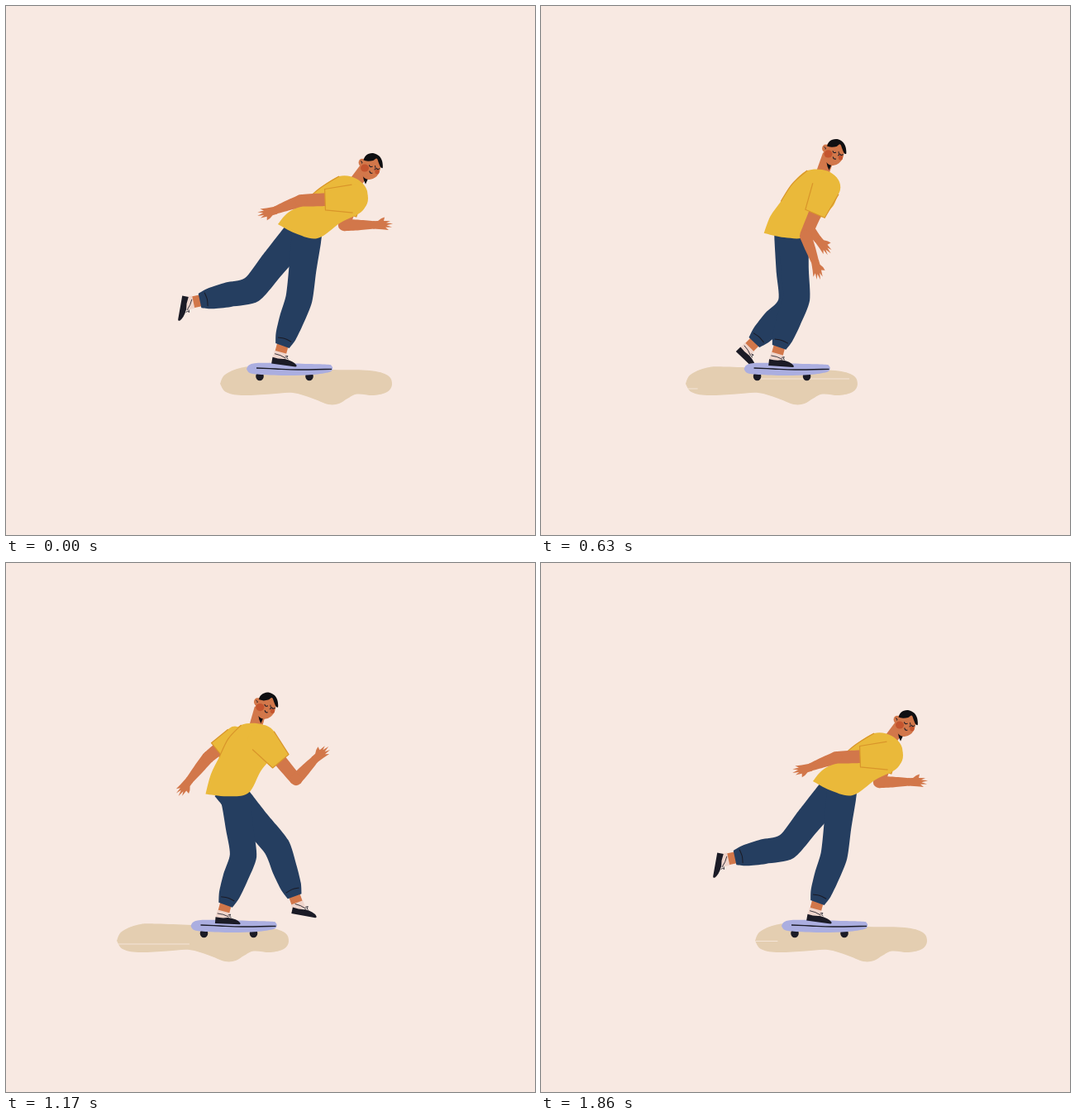
Write an HTML page with a canvas that moves like this. It is 640x640 px and loops after 1890 ms.

```html
<!DOCTYPE html>
<html lang="en">
<head>
<meta charset="utf-8">
<title>Skater</title>
<style>
html, body { margin: 0; width: 100%; height: 100%; overflow: hidden; background: #f8e9e2; }
canvas { display: block; width: 100%; height: 100%; }
</style>
</head>
<body>
<canvas id="stage" width="640" height="640"></canvas>
<script>
const ctx = document.getElementById('stage').getContext('2d');
const LOOP = 1890, STEP = 30, RAD = Math.PI / 180;
const C = {
  bg: '#f8e9e2', sand: '#e4ceb1', line: '#f5e5d8', board: '#abaee0', dark: '#1b1b26',
  skin: '#d2774a', blush: '#c4552f', shirt: '#eab93a', seam: '#d9952a',
  pants: '#253e60', sock: '#efd5cc', hair: '#0f0f12'
};

// ---- motion ----

// Monotone cubic through the keys, at rest at both ends.
function track(times, vals) {
  const n = times.length - 1;
  const rate = i => (vals[i + 1] - vals[i]) / (times[i + 1] - times[i]);
  const slope = vals.map((v, i) => {
    if (i === 0 || i === n) return 0;
    const a = rate(i - 1), b = rate(i);
    return a * b > 0 ? 2 * a * b / (a + b) : 0;
  });
  return t => {
    if (t >= times[n]) return vals[n];
    let i = 0;
    while (t >= times[i + 1]) i++;
    const h = times[i + 1] - times[i], u = (t - times[i]) / h, w = 1 - u;
    return vals[i] * (1 + 2 * u) * w * w + slope[i] * h * u * w * w
      + vals[i + 1] * u * u * (3 - 2 * u) - slope[i + 1] * h * u * u * w;
  };
}

// push, glide, step on, swing, step off, push, back to the start
const KEYS = [0, 480, 810, 1170, 1380, 1620, 1860];
const cycle = (...vals) => track(KEYS, [...vals, vals[0]]);

// Angles in degrees, clockwise from pointing right.
const pose = {
  ride: cycle(0, .472, .872, 1, .424, .072),
  lean: cycle(1, .72, 0, .09, .74, .97),
  nearUpper: cycle(178, 152, 65, 50, 127, 172),
  nearFore: cycle(159, 117, 5, -47, 58, 142),
  farUpper: cycle(108, 103, 108, 141, 125, 111),
  farFore: cycle(0, 18, 99, 129, 110, 11),
  thigh: track([0, 270, ...KEYS.slice(1)], [130, 135, 113, 64, 50, 94, 125, 130]),
  shin: cycle(168, 156, 100, 70, 126, 163),
  foot: cycle(100, 79, 5, 10, 67, 96)
};

// Shirt outline standing up and leaning, measured from the board's tail:
// hem corner, up the back to the neck, chest, belly, hem.
const UPRIGHT = [[16, 281], [22, 256], [31, 235], [41, 212], [56, 195], [82, 194],
  [96, 207], [91, 235], [81, 252], [68, 278], [43, 283]];
const LEANING = [[38, 264], [49, 251], [68, 239], [88, 221], [112, 206], [133, 209],
  [146, 224], [141, 247], [114, 262], [86, 281], [59, 275]];

// ---- drawing helpers ----

const mix = (a, b, u) => [a[0] + (b[0] - a[0]) * u, a[1] + (b[1] - a[1]) * u];
const add = (a, b) => [a[0] + b[0], a[1] + b[1]];
const angle = (a, b) => Math.atan2(b[1] - a[1], b[0] - a[0]);
const reach = (p, deg, d) => [p[0] + Math.cos(deg * RAD) * d, p[1] + Math.sin(deg * RAD) * d];

function spline(p, k = 6) {
  for (let i = 0; i < p.length - 1; i++) {
    const a = p[i - 1] || p[i], b = p[i], c = p[i + 1], d = p[i + 2] || c;
    ctx.bezierCurveTo(b[0] + (c[0] - a[0]) / k, b[1] + (c[1] - a[1]) / k,
      c[0] - (d[0] - b[0]) / k, c[1] - (d[1] - b[1]) / k, c[0], c[1]);
  }
}

function begin(p) { ctx.beginPath(); ctx.moveTo(...p[0]); }

function fill(color) { ctx.closePath(); ctx.fillStyle = color; ctx.fill(); }

function stroke(color, width) { ctx.strokeStyle = color; ctx.lineWidth = width; ctx.stroke(); }

function blob(p, color) { begin(p); spline(p); fill(color); }

function lines(p) { begin(p); p.slice(1).forEach(q => ctx.lineTo(...q)); }

function path(p, color, width) { lines(p); stroke(color, width); }

function curve(p, color, width) { begin(p); spline(p); stroke(color, width); }

function oval(x, y, rx, ry, color, turn = 0) {
  ctx.beginPath();
  ctx.ellipse(x, y, rx, ry, turn, 0, 7);
  fill(color);
}

function local([x, y], turn, draw) {
  ctx.save();
  ctx.translate(x, y);
  ctx.rotate(turn);
  draw();
  ctx.restore();
}

// Tapered tube around a centre line, half widths given per point.
function limb(p, half, color) {
  const left = [], right = [];
  p.forEach((q, i) => {
    const u = angle(p[i - 1] || q, i ? q : p[1]), v = i < p.length - 1 ? angle(q, p[i + 1]) : u;
    const dx = Math.cos(u) + Math.cos(v), dy = Math.sin(u) + Math.sin(v);
    const k = half[i] / (Math.hypot(dx, dy) || 1);
    left.push([q[0] + dy * k, q[1] - dx * k]);
    right.unshift([q[0] - dy * k, q[1] + dx * k]);
  });
  begin(left);
  spline(left, 8);
  ctx.lineTo(...right[0]);
  spline(right, 8);
  fill(color);
}

// ---- parts ----

// Streaks of wind across the sand: height, time, left end at that time, speed.
const STREAKS = [
  [463, 480, 177, .65], [451, 480, 362, .66], [461, 810, 312, .556],
  [461, 1380, 306, .64], [449.5, 1620, 203, .95], [457.5, 1620, 438, 1.09]
];

function puddle(x, t) {
  local([x, 0], 0, () => {
    blob([[0, 457], [6, 446], [26, 437.5], [50, 436.5], [136, 440], [181, 441], [203, 447],
      [208, 458], [202, 467], [186, 471], [166, 469.5], [154, 475], [144, 481], [131, 482],
      [111, 474.5], [88, 468], [61, 469.5], [26, 471], [7, 467], [0, 457]], C.sand);
    ctx.clip();
    STREAKS.forEach(([y, at, left, speed]) => {
      const sx = left - speed * (t - at) - x;
      path([[sx, y], [sx + 110, y]], C.line, 1.2);
    });
  });
}

function board(x) {
  local([x, 0], 0, () => {
    [16, 76].forEach(wx => oval(wx, 448, 4.8, 5.2, C.dark));
    blob([[0, 439], [3, 434.5], [12, 432], [40, 432], [75, 433], [99, 433.8], [103, 435.5], [104, 439],
      [100, 443], [80, 446], [50, 447], [18, 446], [4, 444], [0, 439]], C.board);
    curve([[12, 438], [35, 439], [62, 440], [103, 439.3]], C.dark, 1.3);
  });
}

function foot(cuff, shin, turn) {
  path([reach(cuff, shin, -2), reach(cuff, shin, 9)], C.skin, 14);
  path([reach(cuff, shin, 8), reach(cuff, shin, 17.5)], C.sock, 15.5);
  local(reach(cuff, shin, 16), turn * RAD, () => {
    path([[-6, -5], [1, -4], [8, -1.5]], C.dark, .8);
    path([[7, -3.5], [10, -4.5], [9, -2], [11, -1]], C.dark, .8);
    begin([[-8, -.5]]);
    ctx.quadraticCurveTo(0, 1, 7, -.5);
    ctx.quadraticCurveTo(18, .5, 22, 5);
    ctx.quadraticCurveTo(23, 7, 21, 7.2);
    ctx.lineTo(-8.3, 7.2);
    fill(C.dark);
  });
}

function leg(top, hip, knee, cuff) {
  limb([top, hip, mix(hip, knee, .5), knee, mix(knee, cuff, .45), mix(knee, cuff, .8), cuff],
    [18, 18, 16.6, 16.2, 15, 12.6, 8.8], C.pants);
  local(cuff, angle(knee, cuff), () => curve([[-8, -8.5], [-9, 0], [-7.5, 8.5]], C.dark, 1));
}

function arm(s, e, w, turn) {
  limb([s, mix(s, e, .6), e], [8, 7.8, 7.2], C.skin);
  limb([e, mix(e, w, .5), w], [7.2, 6.2, 4.6], C.skin);
  oval(...e, 7.2, 7.2, C.skin);
  local(w, turn * RAD, () => {
    lines([[-2, -4.6], [4, -5], [8, -8], [12, -9.5], [11, -5], [19, -5], [14, -2.6], [22, -1.6],
      [14.5, .4], [21, 2.6], [13, 2.8], [17, 6], [9, 5.2], [-2, 4.6]]);
    fill(C.skin);
  });
}

function sleeve(s, turn, root, end, length) {
  local(s, turn * RAD, () => {
    lines([[length, -end], [length, end], [0, root]]);
    ctx.arc(0, 0, root, Math.PI / 2, -Math.PI / 2);
    fill(C.shirt);
    path([[2, -root], [length, -end], [length, end], [2, root]], C.seam, 1.2);
  });
}

function head(at, neck) {
  path([add(at, [-5, 3]), neck], C.skin, 15.5);
  local(at, 0, () => {
    lines([[-8.5, 10], [-2, 15], [-5, 21.5], [-7, 17]]);
    fill(C.hair);
    oval(.8, 1, 12.2, 15.2, C.skin, .22);
    oval(-9.2, -4.5, 4.2, 4.8, C.skin);
    path([[-11, -6.5], [-9, -5], [-9.5, -3.5]], C.dark, .9);
    oval(-6, 2, 5, 4.6, C.blush);
    oval(9, 6.5, 2.6, 3, C.blush);
    blob([[-7.5, -7.5], [-5.5, -12], [-1, -15.2], [5, -15.8], [11.5, -12.5], [15, -6.5], [15.8, 1.5],
      [13.2, 1], [11, -4], [8.5, -9.5], [4, -7], [-2, -6.2], [-7.5, -7.5]], C.hair);
    curve([[-.6, -1.6], [.9, .6], [3.6, .2]], C.dark, 1.1);
    curve([[8, 1.8], [9.8, 3.6], [12.2, 2.6]], C.dark, 1.1);
    path([[6.5, -1], [7.2, 3.6], [5.4, 4]], C.dark, .9);
    curve([[-.3, 5.6], [1, 8], [3.4, 8.2]], C.dark, 1.1);
  });
}

function shirt(p) {
  blob([...p, p[0]], C.shirt);
  curve(p.slice(2, 5), C.seam, 1.2);
}

function draw(t) {
  const now = {};
  for (const k in pose) now[k] = pose[k](t);
  const { ride, lean } = now;
  const x = 291 - 67.5 * ride;
  const onBoard = (bx, y) => [x + bx, y];
  const sway = (up, down) => onBoard(...mix(up, down, lean));

  const shoulder = sway([82, 211], [130, 233]);
  const elbow = reach(shoulder, now.nearUpper, 64);
  const wrist = reach(elbow, now.nearFore, 34);
  const farShoulder = add(shoulder, mix([-36, -4], [1, -8], lean));
  const farElbow = reach(farShoulder, now.farUpper, 42);
  const farWrist = reach(farElbow, now.farFore, 37);

  const hip = onBoard(55, 285);
  const knee = reach(hip, now.thigh, 76);
  const cuff = reach(knee, now.shin, 64);
  const standCuff = sway([42, 414], [43.5, 411]);

  ctx.fillStyle = C.bg;
  ctx.fillRect(0, 0, 640, 640);
  ctx.lineJoin = 'round';

  puddle(259 - 125 * ride, t);
  arm(farShoulder, farElbow, farWrist, now.farFore);
  sleeve(farShoulder, now.farUpper, 11, 11, 28);
  foot(cuff, now.shin, now.foot);
  leg(mix(hip, knee, -.25), hip, knee, cuff);
  board(x);
  foot(standCuff, 105, 2 + 6 * lean);
  leg(sway([45, 272], [74, 268]), sway([53, 288], [72, 285]), onBoard(63.5, 354), standCuff);
  head([sway([84, 0], [149, 0])[0], 172 + 22 * lean ** 1.5], sway([73, 197], [132, 213]));
  shirt(UPRIGHT.map((p, i) => sway(p, LEANING[i])));
  arm(shoulder, elbow, wrist, now.nearFore + 8);
  sleeve(shoulder, now.nearUpper, 17, 12.7, 35);
}

const start = performance.now();
function tick() {
  const t = (performance.now() - start) % LOOP;
  draw(Math.floor(t / STEP) * STEP);
  requestAnimationFrame(tick);
}
tick();
</script>
</body>
</html>
```
